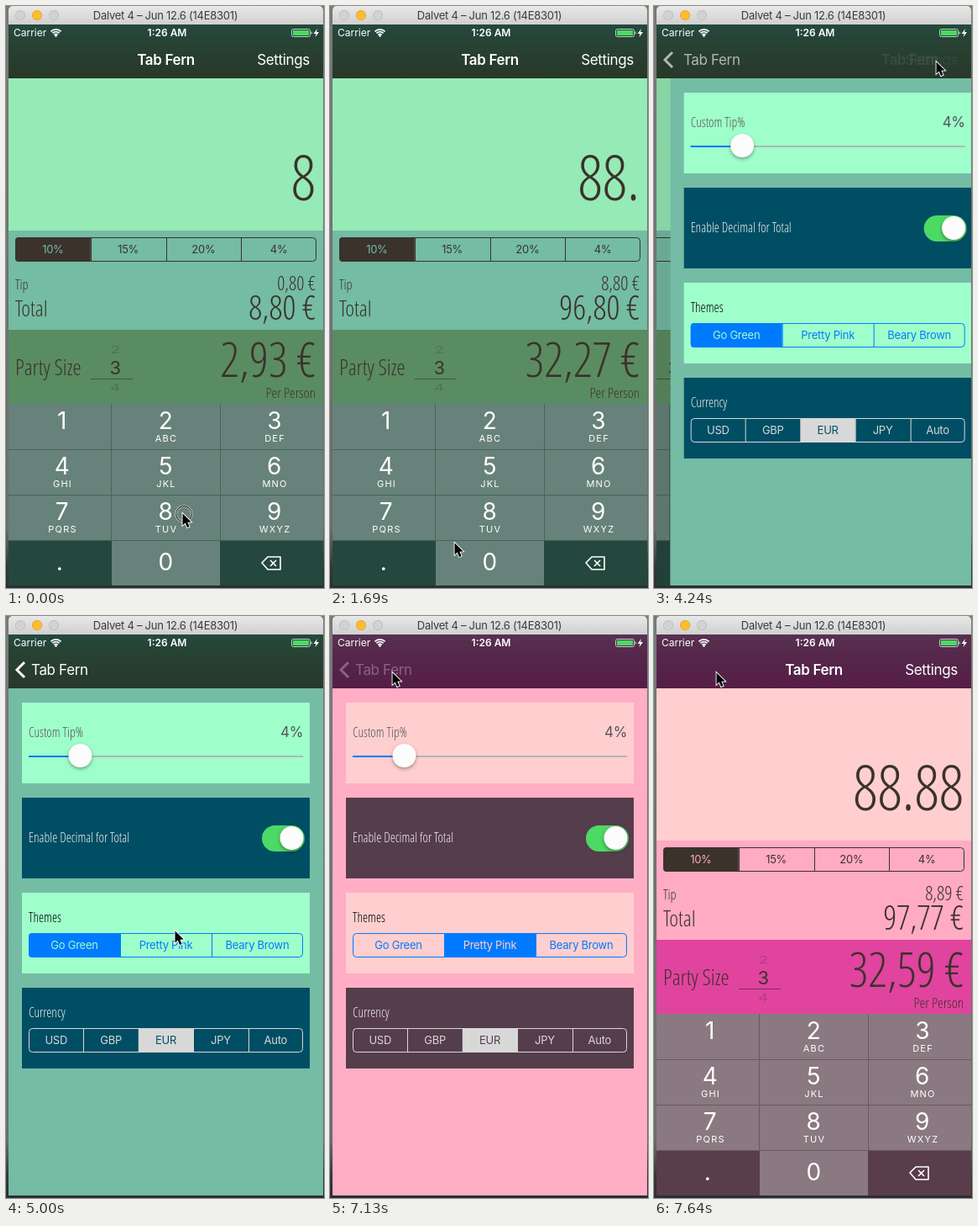
An HTML page with a canvas that plays this animation: 379 by 692 pixels, repeating every 8000 ms.

```html
<!DOCTYPE html>
<html lang="en">
<head>
<meta charset="utf-8">
<title>Tip calculator</title>
<style>
html, body { margin: 0; width: 100%; height: 100%; overflow: hidden; background: #55595c; }
canvas { display: block; width: 379px; height: 692px; }
</style>
</head>
<body>
<canvas id="stage"></canvas>
<script>
const W = 379, H = 692, LOOP = 8000;
const canvas = document.getElementById('stage');
const ctx = canvas.getContext('2d');
const ratio = window.devicePixelRatio || 1;
canvas.width = W * ratio;
canvas.height = H * ratio;

const APP = 'Tab Fern';
const DEVICE = 'Dalvet 4 – Jun 12.6 (14E8301)';
const INK = '#3b322c', BLUE = '#007aff', SILVER = '#d8d8d8', GREEN = '#4cd964';
const SANS = 'Inter, Roboto, sans-serif';
const NARROW = '"Open Sans", "Noto Sans", sans-serif';

const GO_GREEN = {
  bar: ['#24493d', '#28402f', '#27382a'], display: '#96eab5', panel: '#74bca4', party: '#5a8c61',
  key: '#67827a', dark: '#24483e', line: '#49635a', card: '#9fffcb', deep: '#004e64', back: '#74bca4'
};
const PINK = {
  bar: ['#583150', '#55254a', '#561d47'], display: '#ffcfd0', panel: '#ffabc3', party: '#e0449e',
  key: '#8a7980', dark: '#5a3d4b', line: '#6c5863', card: '#ffcfd0', deep: '#553d4c', back: '#ffaec5'
};

const TYPED = [[0, '8'], [120, '88'], [1460, '88.'], [2140, '88.8'], [2570, '88.88']];
const PRESSES = [['8', 60, 200], ['.', 1400, 1510], ['8', 2080, 2220], ['8', 2510, 2620]];
const RINGS = [[0, 120], [1350, 1460], [2030, 2140], [2510, 2570], [3820, 3880], [5400, 5520], [6960, 7060]];
const PATH = [
  [0, 210, 603], [760, 210, 603], [1300, 110, 655], [1580, 110, 655], [1690, 148, 638], [1850, 159, 625],
  [2810, 159, 625], [2980, 386, 250], [3330, 386, 120], [3340, 372, 112], [3460, 336, 66],
  [4710, 336, 66], [5000, 201, 374], [5180, 201, 374], [5260, 197, 386],
  [6000, 197, 386], [6780, 84, 80], [6840, 74, 67], [LOOP, 74, 67]
];

const clamp = v => Math.min(1, Math.max(0, v));
const span = (t, a, b) => clamp((t - a) / (b - a));
const easeOut = p => 1 - (1 - p) ** 3;
const during = (t, a, b) => t >= a && t < b;

function rect(x, y, w, h, fill) {
  ctx.fillStyle = fill;
  ctx.fillRect(x, y, w, h);
}

function round(x, y, w, h, r) {
  ctx.beginPath();
  ctx.roundRect(x, y, w, h, r);
}

function disc(x, y, r, fill) {
  ctx.beginPath();
  ctx.arc(x, y, r, 0, Math.PI * 2);
  ctx.fillStyle = fill;
  ctx.fill();
}

function line(points, color, width = 1) {
  ctx.beginPath();
  points.forEach(([x, y]) => ctx.lineTo(x, y));
  ctx.strokeStyle = color;
  ctx.lineWidth = width;
  ctx.stroke();
}

function write(s, x, y, font, color, align = 'left', spacing = 0) {
  ctx.font = font;
  ctx.letterSpacing = spacing + 'px';
  ctx.textAlign = align;
  ctx.fillStyle = color;
  ctx.fillText(s, x, y);
}

function sans(s, x, y, size, color, align, weight = 400, spacing = -size * 0.02) {
  write(s, x, y, `${weight} ${size}px ${SANS}`, color, align, spacing);
}

function narrow(s, x, y, size, color, align, weight = 300) {
  write(s, x, y, `${weight} condensed ${size}px ${NARROW}`, color, align);
}

function faded(alpha, draw) {
  ctx.save();
  ctx.globalAlpha *= alpha;
  draw();
  ctx.restore();
}

// picks[i] is how far segment i is selected, 0 to 1
function segments(x, y, w, labels, picks, color, onColor) {
  const cell = w / labels.length;
  ctx.save();
  round(x, y, w, 29, 4);
  ctx.clip();
  picks.forEach((p, i) => faded(p, () => rect(x + i * cell, y, cell, 29, color)));
  ctx.restore();
  labels.forEach((s, i) => {
    const cx = x + (i + 0.5) * cell, p = picks[i];
    if (i) line([[Math.round(x + i * cell) + 0.5, y], [Math.round(x + i * cell) + 0.5, y + 29]], color);
    faded(1 - p, () => sans(s, cx, y + 19, 13, color, 'center'));
    faded(p, () => sans(s, cx, y + 19, 13, onColor, 'center'));
  });
  round(x + 0.5, y + 0.5, w - 1, 28, 4);
  ctx.strokeStyle = color;
  ctx.lineWidth = 1;
  ctx.stroke();
}

function deleteIcon() {
  ctx.lineJoin = 'round';
  ctx.beginPath();
  [[305, 662], [312, 655], [327, 655], [327, 670], [312, 670]].forEach(([x, y]) => ctx.lineTo(x, y));
  ctx.closePath();
  ctx.strokeStyle = '#fff';
  ctx.lineWidth = 1.6;
  ctx.stroke();
  line([[315, 659], [322, 666]], '#fff', 1.6);
  line([[322, 659], [315, 666]], '#fff', 1.6);
}

function keypad(c, t) {
  const edges = [3, 126, 255, 378], centers = [66.5, 190, 319.5];
  const letters = ['', 'ABC', 'DEF', 'GHI', 'JKL', 'MNO', 'PQRS', 'TUV', 'WXYZ'];
  const faces = [...'123456789.0', ''];
  faces.forEach((face, i) => {
    const col = i % 3, row = Math.floor(i / 3), x = edges[col], y = 473 + row * 54;
    const held = PRESSES.some(([k, a, b]) => k === face && during(t, a, b));
    const dark = (face === '.' || face === '') !== held;
    rect(x, y, edges[col + 1] - x, 54, dark ? c.dark : c.key);
    const base = y + (row === 3 ? 36 : 30);
    sans(face, centers[col] - (face === '.' ? 3 : 0), base, 28, '#fff', 'center');
    if (letters[i]) sans(letters[i], centers[col] + 1, y + 45, 11, '#fff', 'center', 400, 1.2);
  });
  for (const y of [527.5, 581.5, 635.5]) line([[3, y], [378, y]], c.line);
  line([[125.5, 473], [125.5, 635]], c.line);
  line([[255.5, 473], [255.5, 635]], c.line);
  deleteIcon();
}

function picker() {
  const ghost = (s, y) => {
    ctx.save();
    ctx.translate(130, y);
    ctx.scale(1, 0.6);
    faded(0.3, () => sans(s, 0, 0, 19, INK, 'center'));
    ctx.restore();
  };
  ghost('2', 413);
  ghost('4', 458);
  sans('3', 130, 438, 22, INK, 'center');
  line([[101, 443.5], [151, 443.5]], 'rgba(50,45,40,.6)');
}

function calculator(c, t) {
  const typed = TYPED.findLast(([at]) => t >= at)[1];
  const bill = parseFloat(typed);
  const euro = v => v.toFixed(2).replace('.', ',') + ' €';
  rect(3, 86, 375, 181, c.display);
  rect(3, 267, 375, 118, c.panel);
  rect(3, 385, 375, 88, c.party);
  narrow(typed, 369, 231, 73, INK, 'right');
  segments(11, 275, 359, ['10%', '15%', '20%', '4%'], [1, 0, 0, 0], INK, c.panel);
  narrow('Tip', 11, 337, 16, INK);
  narrow('Total', 11, 369, 26, INK);
  narrow(euro(bill * 0.1), 369, 338, 23, INK, 'right');
  narrow(euro(bill * 1.1), 369, 373, 40, INK, 'right');
  narrow('Party Size', 11, 439, 26, INK);
  narrow(euro(bill * 1.1 / 3), 369, 441, 57, INK, 'right');
  narrow('Per Person', 369, 466, 17, INK, 'right');
  picker();
  keypad(c, t);
}

function knob(x, y) {
  ctx.save();
  ctx.shadowColor = 'rgba(0,0,0,.35)';
  ctx.shadowBlur = 4 * ratio;
  ctx.shadowOffsetY = 2 * ratio;
  disc(x, y, 14, '#fcfcfc');
  ctx.restore();
}

function settings(c, t) {
  rect(3, 22, 375, 667, c.back);
  [103, 216, 329, 442].forEach((y, i) => rect(19, y, 343, 96, i % 2 ? c.deep : c.card));

  narrow('Custom Tip%', 27, 144, 15.5, '#555');
  sans('4%', 354, 144, 17, '#555', 'right');
  line([[27, 167], [354, 167]], '#b4b6b5', 2);
  line([[27, 167], [88, 167]], BLUE, 2);
  knob(88.5, 166);

  narrow('Enable Decimal for Total', 27, 269, 15.5, '#eee');
  round(305, 249, 51, 31, 15.5);
  ctx.fillStyle = GREEN;
  ctx.fill();
  knob(340.5, 264);

  const p = span(t, 5580, 5750);
  const touched = during(t, 5400, 5580) ? 0.2 : 0;
  narrow('Themes', 27, 364, 15.5, '#000');
  segments(27, 377, 327, ['Go Green', 'Pretty Pink', 'Beary Brown'], [1 - p, Math.max(p, touched), 0], BLUE, c.card);
  narrow('Currency', 27, 477, 15.5, '#eee');
  segments(27, 490, 327, ['USD', 'GBP', 'EUR', 'JPY', 'Auto'], [0, 0, 1, 0, 0], SILVER, c.deep);
}

function statusBar() {
  sans('Carrier', 9, 36, 12, '#fff', 'left', 400, 0);
  sans('1:26 AM', 192, 36, 12, '#fff', 'center', 600, 0);
  for (const r of [3, 5.8, 8.6]) {
    ctx.beginPath();
    ctx.arc(59.5, 36.5, r, -Math.PI * 0.75, -Math.PI * 0.25);
    ctx.strokeStyle = '#fff';
    ctx.lineWidth = 1.7;
    ctx.stroke();
  }
  disc(59.5, 35.5, 1.3, '#fff');
  round(340.5, 27.5, 22, 9, 2);
  ctx.strokeStyle = '#b9d8c4';
  ctx.lineWidth = 1;
  ctx.stroke();
  rect(342, 29, 19, 6, GREEN);
  rect(363.5, 30.5, 1.2, 3, '#b9d8c4');
  ctx.beginPath();
  [[371, 27], [366.5, 33], [369.5, 33], [368.5, 37], [373, 31], [370, 31]].forEach(([x, y]) => ctx.lineTo(x, y));
  ctx.fillStyle = '#fff';
  ctx.fill();
}

function navBar(c, t, p) {
  const shade = ctx.createLinearGradient(0, 22, 0, 86);
  c.bar.forEach((color, i) => shade.addColorStop(i / 2, color));
  rect(3, 22, 375, 64, shade);
  statusBar();
  const tapped = t >= 3820 && t < 4500 ? 0.2 : 1;
  const backDim = t >= 6960 ? 0.3 : 1;
  faded((1 - p) ** 0.8, () => sans(APP, 190.5 + p * 120, 70, 17, '#fff', 'center', 600));
  faded(tapped * (1 - p) ** 0.4, () => sans('Settings', 362, 70, 17, '#fff', 'right'));
  faded(backDim * p ** 10, () => {
    line([[22, 55], [13, 64], [22, 73]], '#fff', 3);
    sans(APP, 30 + (1 - p) * 110, 70, 17, '#fff');
  });
}

function windowFrame() {
  const desk = ctx.createLinearGradient(0, 0, 0, H);
  desk.addColorStop(0, '#77797b');
  desk.addColorStop(0.9, '#6a6d70');
  desk.addColorStop(0.96, '#36393d');
  desk.addColorStop(1, '#2b2e33');
  rect(0, 0, W, H, desk);
  const bar = ctx.createLinearGradient(0, 0, 0, 22);
  bar.addColorStop(0, '#e9e8e9');
  bar.addColorStop(1, '#d1d0d1');
  round(3, 0, 375, 24, [5, 5, 0, 0]);
  ctx.fillStyle = bar;
  ctx.fill();
  [17, 37, 57].forEach((x, i) => {
    disc(x, 11, 6, i === 1 ? '#dfa023' : '#b9b8b9');
    disc(x, 11, 5.3, i === 1 ? '#fdbc2f' : '#d3d2d3');
  });
  sans(DEVICE, 190, 16, 13, '#3b3b3b', 'center');
}

function pointer(t) {
  const i = PATH.findIndex(([at]) => at > t);
  const [t0, x0, y0] = PATH[i - 1], [t1, x1, y1] = PATH[i];
  const p = span(t, t0, t1);
  const x = x0 + (x1 - x0) * p, y = y0 + (y1 - y0) * p;
  if (RINGS.some(([a, b]) => during(t, a, b))) {
    for (const [width, color] of [[2.6, 'rgba(255,255,255,.8)'], [1.2, '#222']]) {
      ctx.beginPath();
      ctx.arc(x + 2, y + 1, 9.3, 0, Math.PI * 2);
      ctx.strokeStyle = color;
      ctx.lineWidth = width;
      ctx.stroke();
    }
  }
  ctx.save();
  ctx.translate(x, y);
  ctx.beginPath();
  [[0.5, 0.5], [0.5, 14.5], [3.7, 11.5], [6, 17], [8.6, 16], [6.3, 10.8], [10.7, 10.5]].forEach(([a, b]) => ctx.lineTo(a, b));
  ctx.closePath();
  ctx.fillStyle = '#000';
  ctx.strokeStyle = '#fff';
  ctx.lineWidth = 1.8;
  ctx.stroke();
  ctx.fill();
  ctx.restore();
}

// 0 shows the calculator, 1 the settings
function pushed(t) {
  if (t < 4240) return 0;
  if (t < 7180) return 0.955 + 0.045 * easeOut(span(t, 4240, 4470));
  return 1 - easeOut(span(t, 7180, 7640));
}

function draw(t) {
  const c = t < 5600 ? GO_GREEN : PINK;
  const p = pushed(t);
  ctx.setTransform(ratio, 0, 0, ratio, 0, 0);
  windowFrame();
  ctx.save();
  ctx.beginPath();
  ctx.rect(3, 22, 375, 667);
  ctx.clip();
  if (p < 1) {
    ctx.save();
    ctx.translate(-112 * p, 0);
    calculator(c, t);
    ctx.restore();
    rect(3, 86, 375, 603, `rgba(0,0,0,${0.1 * p})`);
  }
  if (p > 0) {
    ctx.save();
    ctx.translate(375 * (1 - p), 0);
    settings(c, t);
    ctx.restore();
  }
  navBar(c, t, p);
  ctx.restore();
  pointer(t);
}

function tick() {
  draw(performance.now() % LOOP);
  requestAnimationFrame(tick);
}
tick();
</script>
</body>
</html>
```
